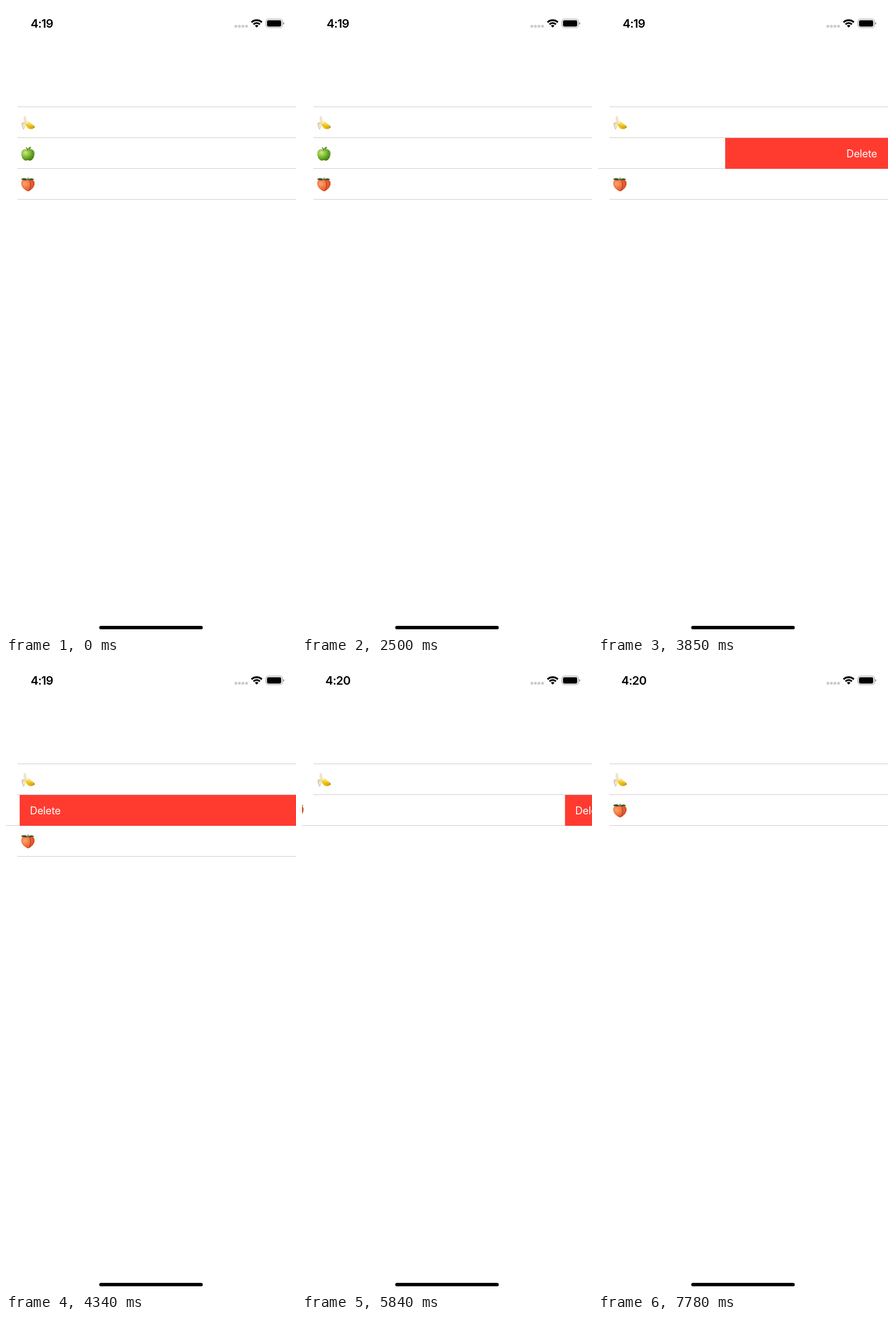
An HTML page for the animation above (7.87 s loop, 509 by 1101 pixels).

```html
<!DOCTYPE html>
<html lang="en">
<head>
<meta charset="utf-8">
<title>Swipe to delete</title>
<style>
  html, body { margin: 0; width: 100%; height: 100%; overflow: hidden; background: #fff; }
  svg { display: block; width: 509px; height: 1101px; }
  text { font-family: Inter, Roboto, sans-serif; }
  #clock { font-size: 20.5px; font-weight: 600; letter-spacing: -.7px; text-anchor: middle; }
  .label { font-size: 18.2px; letter-spacing: -.2px; fill: #fff; }
  .line { fill: #cfcfd1; }
  .red { fill: #ff3b30; }
</style>
</head>
<body>
<svg viewBox="0 0 509 1101">
  <defs>
    <radialGradient id="peachSkin" cx=".28" cy=".36" r=".8">
      <stop offset="0" stop-color="#ffa46c"/><stop offset=".5" stop-color="#f0703f"/><stop offset="1" stop-color="#cf3d18"/>
    </radialGradient>
    <radialGradient id="appleSkin" cx=".32" cy=".3" r=".8">
      <stop offset="0" stop-color="#cdea84"/><stop offset=".45" stop-color="#80bb35"/><stop offset="1" stop-color="#37750f"/>
    </radialGradient>
    <linearGradient id="bananaSkin" x2=".5" y2="1">
      <stop offset="0" stop-color="#f7e07c"/><stop offset=".5" stop-color="#fad62f"/><stop offset="1" stop-color="#dfac14"/>
    </linearGradient>

    <g id="banana">
      <path fill="#efe4cd" d="M-7-11.5C-5-13.5-3.2-11-2.8-8L-1.5 0-6 2C-7.5-3-8-8-7-11.5Z"/>
      <path fill="#ddd0b8" d="M-4 0C-9-1.5-12-1-11.3 2-11 6-9.5 9-8.5 12-6.5 12.5-5.5 9-4 5Z"/>
      <path fill="#f2e9d6" d="M-5 1C-8 1-9 4-7.8 9-6 8-5 6-4 3Z"/>
      <path fill="url(#bananaSkin)" d="M-5 1C-4-3 1-4 3.5-1 5 2 8 2 11 5 12.5 9 9 11.5 5 11-.5 10.5-4 6-5 1Z"/>
      <path fill="none" stroke="#fbf3d2" stroke-width="2" d="M-3.5 1Q-1-2 2-.5"/>
      <path fill="none" stroke="#c4951a" stroke-width=".8" d="M-2.5 2Q2 7.5 10 8.3"/>
      <path fill="none" stroke="#75602a" stroke-width="1.2" d="M11 6V8.8"/>
    </g>
    <g id="apple">
      <path fill="none" stroke="#66461f" stroke-width="1.4" d="M-.3-5Q-.8-9-3-11"/>
      <path fill="url(#appleSkin)" d="M0-6C4-9 11.5-8 11.5 0 11.5 7 7 12.3 3.5 12.3 2 12.3 1 11.6 0 11.6S-2 12.3-3.5 12.3C-7 12.3-11.5 7-11.5 0-11.5-8-4-9 0-6Z"/>
      <path fill="#4d8a1c" opacity=".7" d="M-4-6.3Q0-3.5 4-6.3Q0-5.6-4-6.3Z"/>
      <path fill="#5c9c26" d="M0-6.5C0-10 2-12 5.5-12.2 5.5-9 3.5-6.5 0-6.5Z"/>
    </g>
    <g id="peach">
      <path fill="url(#peachSkin)" d="M0-8C4-10 11.8-9.5 11.8-2 11.8 5 5.5 10 .5 12.2-5 10-11.8 5-11.8-2-11.8-9.5-4-10 0-8Z"/>
      <path fill="none" stroke="#97301a" stroke-width="1" d="M3-8C5.5-3 5.5 5 2.5 10.5"/>
      <path fill="#3a5a20" d="M0-8.2C-3-12-9-12-12-9.2-8.5-6.8-4-6.7 0-8.2ZM0-8.2C3-11.2 8-11.5 11.2-8.8 8-7.2 4-7 0-8.2Z"/>
      <path stroke="#4b3015" stroke-width="1.4" d="M.3-8V-12"/>
    </g>
    <clipPath id="cell"><rect y="1" width="509" height="54"/></clipPath>
  </defs>

  <rect width="509" height="1101" fill="#fff"/>
  <text id="clock" x="62.9" y="37.6">4:19</text>
  <g id="dots" fill="#c9c9cb"></g>
  <g transform="translate(440 37.7)" fill="none" stroke="#000" stroke-width="3.2">
    <path d="M-9.02-9.02A12.75 12.75 0 0 1 9.02-9.02M-5.6-5.6A7.9 7.9 0 0 1 5.6-5.6"/>
    <path fill="#000" stroke="none" d="M0 0-3.2-3.2A4.5 4.5 0 0 1 3.2-3.2Z"/>
  </g>
  <rect x="456.2" y="23" width="29.2" height="14.8" rx="4.2" fill="none" stroke="#858585" stroke-width=".9"/>
  <rect x="458.1" y="25" width="25" height="10.9" rx="2.4"/>
  <path fill="#858585" d="M486.6 28Q488.4 28.6 488.4 30.4T486.6 32.8Z"/>

  <rect class="line" x="20" y="176" width="489" height="1"/>
  <g id="rows"></g>
  <rect x="163.6" y="1084.9" width="181.8" height="6.2" rx="3.1"/>
</svg>

<script>
const LOOP = 7870, WIDTH = 509, TOP = 176, ROW = 54;
const BUTTON = 91, PAD = 18;
const NAMES = ['banana', 'apple', 'peach'];
const MINUTE_TURNS = 5840;

const smooth = u => u * u * (3 - 2 * u);
const out = power => u => 1 - (1 - u) ** power;

// Moves: start, end, value reached, easing.
const APPLE_DRAG = [[3350, 4245, 485, smooth], [4500, 4560, WIDTH, smooth]];
const LABEL_SHIFT = [[3920, 4340, 1, out(2)]];
const COLLAPSE = [[4500, 4910, ROW, smooth]];
const PEACH_DRAG = [
  [MINUTE_TURNS, MINUTE_TURNS, 47, smooth],
  [MINUTE_TURNS, 6180, 114, out(2)],
  [6350, 6680, -33, out(4)],
  [6930, 7680, 0, out(3)]
];

const $ = id => document.getElementById(id);

function follow(moves, t) {
  let value = 0;
  for (const [start, end, to, ease] of moves) {
    if (t < start) break;
    const u = t >= end ? 1 : (t - start) / (end - start);
    value += (to - value) * ease(u);
  }
  return value;
}

$('dots').innerHTML = [0, 1, 2, 3].map(i =>
  `<rect x="${401.2 + i * 6.2}" y="33.2" width="4.6" height="4.6" rx="1"/>`).join('');

$('rows').innerHTML = NAMES.map(name => `
  <g id="${name}Row" clip-path="url(#cell)">
    <rect y="1" width="${WIDTH}" height="${ROW}" fill="#fff"/>
    <g class="body">
      <rect class="line" x="20" y="${ROW}" width="${WIDTH + 20}" height="1"/>
      <use href="#${name}" x="38.4" y="28.4"/>
    </g>
    <rect class="red" y="1" width="${WIDTH}" height="${ROW}"/>
    <text class="label" y="34.6">Delete</text>
  </g>`).join('');

const rows = NAMES.map(name => {
  const el = $(name + 'Row');
  const find = s => el.querySelector(s);
  return { el, body: find('.body'), red: find('.red'), label: find('.label') };
});

// The label stays by the right side until shift carries it to the red edge.
function drawRow(row, y, drag, shift = 0) {
  const edge = WIDTH - drag;
  const rest = Math.max(edge, WIDTH - BUTTON);
  row.el.setAttribute('transform', `translate(0 ${y})`);
  row.body.setAttribute('transform', `translate(${-drag} 0)`);
  row.red.setAttribute('x', edge);
  row.label.setAttribute('x', rest + (edge - rest) * shift + PAD);
}

function render(t) {
  $('clock').textContent = t < MINUTE_TURNS ? '4:19' : '4:20';
  drawRow(rows[0], TOP, 0);
  drawRow(rows[1], TOP + ROW, follow(APPLE_DRAG, t), follow(LABEL_SHIFT, t));
  drawRow(rows[2], TOP + 2 * ROW - follow(COLLAPSE, t), follow(PEACH_DRAG, t));
}

const begin = performance.now();
function tick() {
  render((performance.now() - begin) % LOOP);
  requestAnimationFrame(tick);
}
tick();
</script>
</body>
</html>
```
